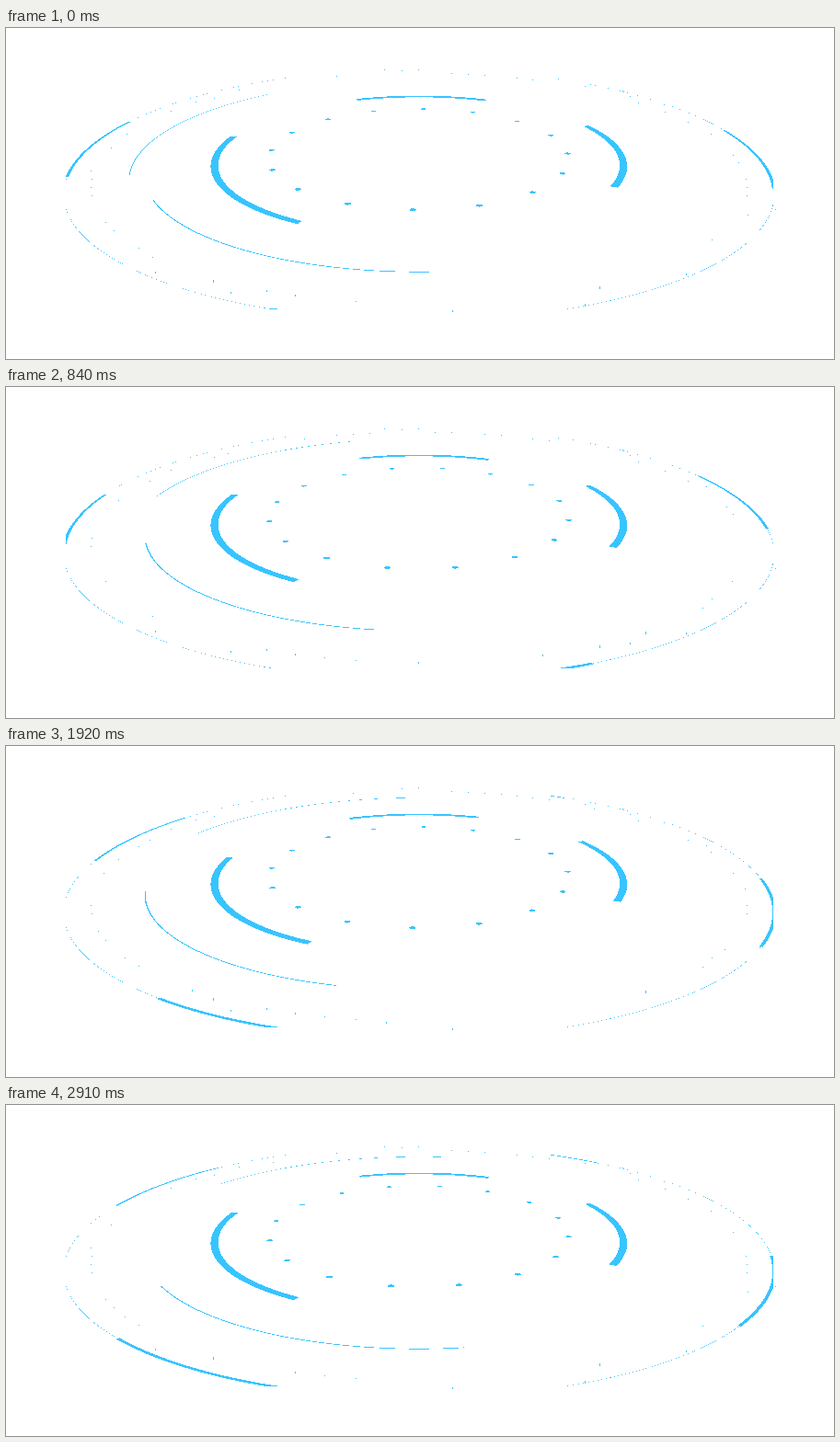
Animation, 900 px wide and 360 px high, one loop 2.94 s. Source, as an HTML page with a canvas:

```html
<!DOCTYPE html>
<html lang="en">
<head>
<meta charset="utf-8">
<title>Tilted rings</title>
<style>
html, body { margin: 0; width: 100%; height: 100%; overflow: hidden; background: #fff; }
canvas { display: block; }
</style>
</head>
<body>
<canvas width="900" height="360"></canvas>
<script>
const W = 900, H = 360, LOOP = 2940, STEP = 30;
const CX = 448.8, CY = 134.6, TILT = 0.333, DEPTH = 0.00094;
const ctx = document.querySelector('canvas').getContext('2d');
const image = ctx.createImageData(W, H);
const pixels = new Uint32Array(image.data.buffer);
const BLUE = 0xffffc438, WHITE = 0xffffffff; // ABGR

const { PI, sin, cos, hypot, round } = Math;
const rad = degrees => degrees * PI / 180;
const rand = seed => {
  const v = sin(seed * 12.9898) * 43758.5453;
  return v - Math.floor(v);
};
const inArc = (angle, start, length, period = 360) =>
  (angle - start + 720) % period < length;

// Rings on the tilted plane: the key poses are rotations in degrees at KEYS
const KEYS = [0, 510, 1170, 1650, 1920, 2490, 2910];
const RINGS = [
  { radius: 161, half: 3.1, poses: [2, 14.5, 4.2, 0.9, 2.1, 6.7, 9.2],
    lit: (angle, turn, off) => {
      const side = (angle - turn + 371.25) % 22.5 - 11.25;
      return hypot(off, rad(side) * 161) < 3.1;
    } },
  { radius: 217.6, half: 3.8, poses: [0, 12.3, -13, -17.8, -2.8, -6.6, 0.9],
    lit: (angle, turn) => inArc(angle, turn - 21.5, 45)
      || inArc(angle, turn + 65, 53.5) || inArc(angle, turn + 209.3, 74.5) },
  { radius: 286.6, half: 0.55, poses: [178, 167.9, 207.2, 204, 193.3, 185.8, 172.8],
    lit: (angle, turn) => inArc(angle, turn, 63.3) },
  { radius: 302, half: 0.5, poses: [256.6, 273.5, 284.8, 297.5, 296, 280.9, 304.3],
    lit: (angle, turn) => inArc(angle, turn, 63) },
  { radius: 363, half: 1.5, poses: [17.5, 6.5, 14.5, 27, 34, 42.7, 42.4], clipped: true,
    lit: (angle, turn, off) => Math.abs(off) < 0.14
      || inArc(angle, turn - 29.5, 29.5, 90) }
];

// Smooth curve through the key poses
function poseAt(poses, t) {
  const last = KEYS.length - 1;
  const tangent = i => {
    const a = Math.max(i - 1, 0), b = Math.min(i + 1, last);
    return (poses[b] - poses[a]) / (KEYS[b] - KEYS[a]);
  };
  let i = 0;
  while (i < last - 1 && t > KEYS[i + 1]) i++;
  const span = KEYS[i + 1] - KEYS[i], u = Math.min(1, (t - KEYS[i]) / span);
  const u2 = u * u, u3 = u2 * u;
  return poses[i] + (poses[i + 1] - poses[i]) * (3 * u2 - 2 * u3)
    + span * (tangent(i) * (u3 - 2 * u2 + u) + tangent(i + 1) * (u3 - u2));
}

// Project every pixel back onto the plane and keep those that touch a ring
const samples = [];
for (let y = 0; y < H; y++) {
  for (let x = 0; x < W; x++) {
    const sy = y + 0.5 - CY;
    const py = sy / (TILT + DEPTH * sy);
    const px = (x + 0.5 - CX) * (1 - DEPTH * py);
    const r = hypot(px, py);
    const ring = RINGS.find(g => Math.abs(r - g.radius) < g.half);
    if (!ring) continue;
    if (ring.clipped && (x < 65 || x > 833 || y < 54 || y > 305)) continue;
    const angle = (Math.atan2(px, -py) * 180 / PI + 360) % 360;
    samples.push({ i: y * W + x, ring, angle, off: r - ring.radius });
  }
}

// Flickering specks every four degrees, taller where the plane is near
const specks = Array.from({ length: 90 }, (_, i) => {
  const a = rad(4 * i), r = 338 + 30 * rand(i + 1) ** 4;
  const scale = 1 / (1 + DEPTH * r * cos(a));
  return {
    x: Math.floor(CX + r * sin(a) * scale),
    y: Math.floor(CY - r * cos(a) * TILT * scale),
    height: scale > 1.36 ? 1 + round(2 * rand(i + 300)) : 1,
    cycles: 3 + i % 7,
    phase: 2 * PI * rand(i + 100),
    bias: 1.6 * rand(i + 200) - 0.6
  };
});

function draw(now) {
  const t = Math.floor(now % LOOP / STEP) * STEP;
  pixels.fill(WHITE);
  for (const ring of RINGS) ring.turn = poseAt(ring.poses, t);
  for (const { i, ring, angle, off } of samples) {
    if (ring.lit(angle, ring.turn, off)) pixels[i] = BLUE;
  }
  for (const s of specks) {
    if (sin(2 * PI * s.cycles * t / LOOP + s.phase) + s.bias < 0) continue;
    for (let d = 0; d < s.height; d++) pixels[(s.y + d) * W + s.x] = BLUE;
  }
  ctx.putImageData(image, 0, 0);
}

let begin;
function tick(now) {
  begin ??= now;
  draw(now - begin);
  requestAnimationFrame(tick);
}
draw(0);
requestAnimationFrame(tick);
</script>
</body>
</html>
```
